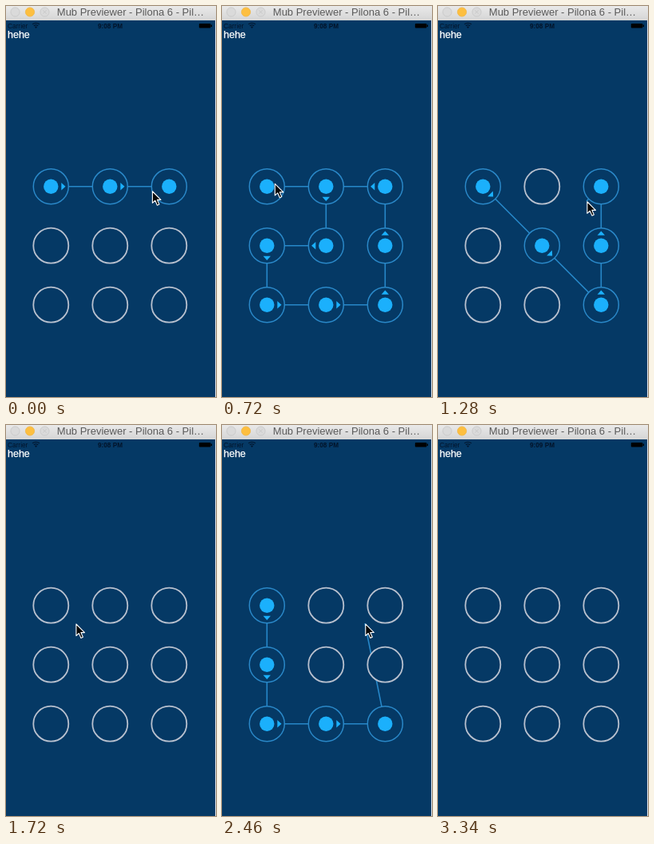
Animation of 263x489 px, one loop 3.58 s. Source, as an HTML page:

```html
<!DOCTYPE html>
<html lang="en">
<head>
<meta charset="utf-8">
<title>Pattern lock</title>
<style>
  html, body { margin: 0; width: 100%; height: 100%; overflow: hidden; background: #053965; }
  svg { display: block; width: 100%; height: 100%; }
  text { font-family: "Liberation Sans", Arial, sans-serif; }
  .ring { fill: #053965; stroke: #b9c1cf; stroke-width: 1.8; }
  .dot, .arrow { fill: #1bb0fc; visibility: hidden; }
  .on .ring { stroke: #2a88c8; stroke-width: 1.5; }
  .on .dot, .next .arrow { visibility: visible; }
  #trail { fill: none; stroke: #2788c9; stroke-width: 1.6; }
</style>
</head>
<body>
<svg viewBox="0 0 263 489">
  <defs>
    <linearGradient id="bar" x2="0" y2="1">
      <stop offset="0" stop-color="#e9e9e9"/>
      <stop offset="1" stop-color="#d5d5d5"/>
    </linearGradient>
  </defs>
  <rect width="263" height="489" fill="#dfe3e8"/>
  <rect y="18" width="262" height="471" fill="#053965"/>

  <rect width="263" height="18" fill="url(#bar)"/>
  <g stroke-width=".8">
    <circle cx="11.5" cy="7.5" r="5.6" fill="#dadada" stroke="#c6c6c6"/>
    <circle cx="30" cy="7.5" r="5.6" fill="#fdbf40" stroke="#f0b545"/>
    <circle cx="48.5" cy="7.5" r="5.6" fill="#dadada" stroke="#c6c6c6"/>
    <path d="M46.5 5.5l4 4m0-4l-4 4" stroke="#c2c2c2"/>
  </g>
  <text x="63.8" y="12" font-size="13" fill="#5a5a5a">Mub Previewer - Pilona 6 - Pil…</text>

  <g fill="#03142a">
    <text x="2" y="28" font-size="8.3">Carrier</text>
    <text id="clock" x="130.5" y="28" font-size="8.2" font-weight="bold" text-anchor="middle">9:08 PM</text>
    <rect x="241.8" y="22" width="14.5" height="5.6" rx="1" fill="#000"/>
    <rect x="256.6" y="23.5" width="1.4" height="2.6" fill="#000"/>
    <path d="M37.5 28l-1.5-2q1.5-1.2 3 0z"/>
    <path d="M34.8 24.7q2.7-2 5.4 0M33.2 22.8q4.3-3 8.6 0" fill="none" stroke="#03142a" stroke-width="1.1"/>
  </g>
  <text x="2" y="39.5" font-size="12.5" fill="#fff" stroke="#fff" stroke-width=".25">hehe</text>

  <polyline id="trail"/>
  <g id="nodes"></g>
  <path id="cursor" d="M0 0V14.6L3.4 11.5L6 17.4L8.5 16.3L6 10.6H10.6Z"
        fill="#080808" stroke="#fff" stroke-width="1.1" stroke-linejoin="round"/>
</svg>
<script>
  const LOOP = 3580, STEP = 20, HOLD = 40, HIT = 23, TIP = 0.8;
  const CLOCK_TICK = 3300, CURSOR_GONE = 3340;
  const $ = id => document.getElementById(id);

  const centers = Array.from({ length: 9 }, (_, i) =>
    [56.3 + 74 * (i % 3), 225.7 + 74 * Math.floor(i / 3)]);
  const place = stop => Array.isArray(stop) ? stop : centers[stop];

  // Routes list node numbers or free points; "away" leads to the next press.
  const strokes = [
    { press: -60, arrive: 180, route: [0, 1, [183, 231], 2, 4, 6, 7, 8], away: [[216, 452]] },
    { press: 350, arrive: 720, route: [1, 4, 3, 6, 7, 8, 5, 2, [65.5, 221.5]], away: [] },
    { press: 900, arrive: 1462, route: [0, 4, 8, 5, 2, 4, 6], away: [[8, 380], [87.5, 248.5]] },
    { press: 1761, arrive: 2515, route: [0, 3, 6, 7, 8, [170, 310], [179, 248], 2], away: [] },
    { press: 2740, arrive: 3111, route: [0, 4, 8, 3], away: [[220, -20]] }
  ];

  // The pointer draws a route, holds, then travels to the next one.
  const legs = strokes.flatMap(({ press, arrive, route, away }, i) => {
    const next = strokes[i + 1];
    const last = route[route.length - 1];
    return [
      { from: press, to: arrive, points: route.map(place) },
      {
        from: arrive + HOLD,
        to: next ? next.press : CURSOR_GONE,
        points: [last, ...away, ...(next ? [next.route[0]] : [])].map(place)
      }
    ];
  });

  const distance = (a, b) => Math.hypot(b[0] - a[0], b[1] - a[1]);

  // Point at fraction k of a polyline's length
  function along(points, k) {
    const lengths = points.slice(1).map((p, i) => distance(points[i], p));
    let rest = k * lengths.reduce((a, b) => a + b, 0);
    for (let i = 0; i < lengths.length; i++) {
      if (rest < lengths[i]) {
        const [a, b] = [points[i], points[i + 1]], f = rest / lengths[i];
        return [a[0] + (b[0] - a[0]) * f, a[1] + (b[1] - a[1]) * f];
      }
      rest -= lengths[i];
    }
    return points[points.length - 1];
  }

  function pointerAt(t) {
    const { from, to, points } = legs.filter(leg => leg.from <= t).pop();
    return along(points, Math.min(1, (t - from) / (to - from)));
  }

  // Nodes touched, in order, since the press
  function touched(from, to) {
    const path = new Set();
    for (let t = from; t <= to; t += 5) {
      const tip = pointerAt(t);
      const hit = centers.findIndex(c => distance(c, tip) < HIT);
      if (hit >= 0) path.add(hit);
    }
    return [...path];
  }

  const nodes = centers.map(([x, y]) => {
    const g = document.createElementNS('http://www.w3.org/2000/svg', 'g');
    g.setAttribute('transform', `translate(${x} ${y})`);
    g.innerHTML = '<circle class="ring" r="22"/><circle class="dot" r="9.2"/>' +
      '<path class="arrow" d="M13-4.7L18.2 0L13 4.7Z"/>';
    $('nodes').append(g);
    return g;
  });

  function draw(t) {
    const tip = pointerAt(t);
    const stroke = strokes.find(s => t >= s.press && t < s.arrive + HOLD);
    const path = stroke ? touched(stroke.press, t) : [];
    const points = path.map(place);
    if (points.length) points.push(tip);
    $('trail').setAttribute('points', points.join(' '));

    nodes.forEach((g, i) => {
      const at = path.indexOf(i);
      const next = at >= 0 && centers[path[at + 1]];
      g.setAttribute('class', (at >= 0 ? 'on' : '') + (next ? ' next' : ''));
      if (next) {
        const [x, y] = centers[i];
        const angle = Math.atan2(next[1] - y, next[0] - x) * 180 / Math.PI;
        g.lastChild.setAttribute('transform', `rotate(${angle})`);
      }
    });

    $('cursor').setAttribute('transform', `translate(${tip[0] + TIP} ${tip[1] + TIP})`);
    $('cursor').setAttribute('visibility', t < CURSOR_GONE ? 'visible' : 'hidden');
    $('clock').textContent = t < CLOCK_TICK ? '9:08 PM' : '9:09 PM';
  }

  const start = performance.now();
  function frame() {
    const t = (performance.now() - start) % LOOP;
    draw(Math.floor(t / STEP) * STEP);
    requestAnimationFrame(frame);
  }
  frame();
</script>
</body>
</html>
```
